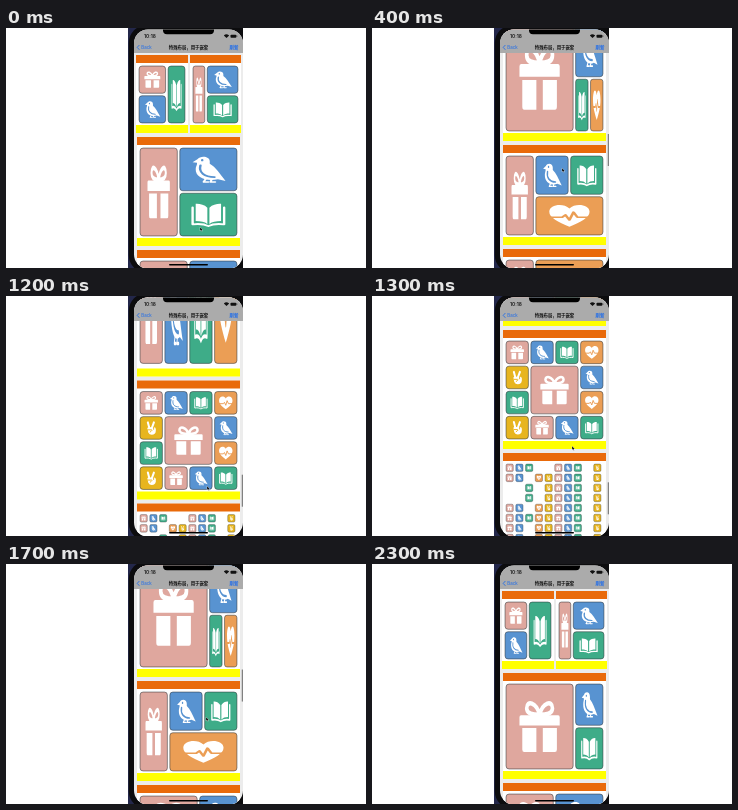
These frames come from a looping animation (360x240 px, 2400 ms). An HTML page with a canvas:

```html
<!DOCTYPE html>
<html lang="zh">
<head>
<meta charset="utf-8">
<style>
  html, body { margin: 0; width: 100%; height: 100%; overflow: hidden; background: #fff; }
  canvas { display: block; width: 360px; height: 240px; }
</style>
</head>
<body>
<canvas id="stage"></canvas>
<script>
const canvas = document.getElementById('stage');
const ctx = canvas.getContext('2d');
const dpr = window.devicePixelRatio || 1;
canvas.width = 360 * dpr;
canvas.height = 240 * dpr;

// Icons live in a 100 x 100 box: white fill, white line, and a line cut in the tile colour.
const icon = (color, fill, line, cut, lineWidth = 9) => ({
  color, lineWidth, fill: new Path2D(fill), line: new Path2D(line), cut: new Path2D(cut)
});
const icons = {
  g: icon('#dfa79e',
    'M4 28H96Q100 28 100 32V48H0V32Q0 28 4 28ZM7 53H42V100H12Q7 100 7 95ZM58 53H93V95Q93 100 88 100H58Z',
    'M50 27C42 2 18 -2 18 14C18 24 32 27 50 27C58 2 82 -2 82 14C82 24 68 27 50 27', ''),
  b: icon('#5893d1',
    'M4 22L18 10C26 -5 54 -3 54 18V28C72 42 82 64 100 95L78 88C44 98 12 82 13 48C13 38 18 32 17 24Z',
    'M42 88L36 99H50M60 88L56 99H70', 'M27 34C21 62 38 80 68 80M32 13V15', 6),
  k: icon('#3eac88',
    'M47 23C38 11 24 7 13 8V75C28 75 39 78 47 87ZM53 23C62 11 76 7 87 8V75C72 75 61 78 53 87Z',
    'M4 22V88C24 85 40 88 50 95C60 88 76 85 96 88V22', '', 7),
  h: icon('#eb9e55',
    'M50 98C22 76 0 58 0 32C0 2 34 -8 50 18C66 -8 100 2 100 32C100 58 78 76 50 98Z',
    '', 'M0 56H32L40 46L50 68L60 34L70 56H100', 7),
  p: icon('#e7b51f',
    'M22 52Q22 45 30 45H72Q84 46 84 58V72Q82 100 54 100Q36 100 28 84Z',
    'M36 50L25 9M55 50L70 9', 'M28 64H52Q62 66 50 74L42 80M68 46V60', 15)
};

function tile(key, x, y, w, h) {
  if (!icons[key]) return;
  const { color, fill, line, cut, lineWidth } = icons[key];
  const gap = 1.25;
  x += gap; y += gap; w -= 2 * gap; h -= 2 * gap;
  ctx.beginPath();
  ctx.roundRect(x, y, w, h, Math.min(3, w / 5));
  ctx.fillStyle = color;
  ctx.fill();
  ctx.strokeStyle = 'rgba(45,50,55,.75)';
  ctx.lineWidth = Math.min(.7, w * .06);
  ctx.stroke();
  ctx.save();
  ctx.translate(x + w * .2, y + h * .2);
  ctx.scale(w * .006, h * .006);
  ctx.lineJoin = ctx.lineCap = 'round';
  ctx.fillStyle = ctx.strokeStyle = '#fff';
  ctx.lineWidth = lineWidth;
  ctx.fill(fill);
  ctx.stroke(line);
  ctx.strokeStyle = color;
  ctx.lineWidth = 7;
  ctx.stroke(cut);
  ctx.restore();
}

// Layouts are nested functions that fill a rectangle.
const place = (node, ...box) => typeof node === 'string' ? tile(node, ...box) : node(...box);
const split = vertical => (weights, ...nodes) => (x, y, w, h) => {
  const total = weights.reduce((a, b) => a + b);
  let start = 0;
  nodes.forEach((node, i) => {
    const part = weights[i] / total;
    if (vertical) place(node, x, y + h * start, w, h * part);
    else place(node, x + w * start, y, w * part, h);
    start += part;
  });
};
const row = split(false), col = split(true);
const even = [1, 1], four = [1, 1, 1, 1];
const line = keys => row([...keys].map(() => 1), ...keys);

function rect(color, x, y, w, h) {
  ctx.fillStyle = color;
  ctx.fillRect(x, y, w, h);
}

function section(x, y, w, h, layout) {
  rect('#fff', x, y, w, h + 21);
  rect('#e96a0a', x, y, w, 8);
  rect('#ffff00', x, y + h + 13, w, 8);
  layout(x + 1.8, y + 9.8, w - 3.6, h + 2.4);
}

function sections(t) {
  const late = t >= 1700;
  const small = ['gb_hp', 'gb_hp', '__k_p', '__k_p', 'gb_hp', 'gbkhp', 'gb_hp', 'gb_hp', 'gb_hp', 'gbkhp'];
  if (t < 1500) small[0] = 'gbk__';
  return [
    [late ? 85 : 88, row(late ? [7, 3] : [2, 3], 'g', col(even, 'b', 'k'))],
    [104, col([2, 3], row(even, 'g', 'b'), 'k')],
    [100, col(even, 'g', row(even, 'b', 'k'))],
    [106, row([7, 3], 'g', col(even, 'b', row(even, 'k', 'h')))],
    [79, row([3, 7], 'g', col(even, row(even, 'b', 'k'), 'h'))],
    [70, late
      ? col(even, row([6, 4], 'g', 'b'), row([4, 6], 'k', 'h'))
      : row([3, 7], col(even, 'g', row(even, 'b', 'k')), 'h')],
    [100, row(even, col(even, row(even, 'g', 'b'), 'k'), 'h')],
    [100, col([97, 3], row(four, 'g', 'b', 'k', 'h'), '')],
    [98, col([1, 2, 1], line('gbkh'),
      row([1, 2, 1], col(even, 'p', 'k'), 'g', col(even, 'b', 'h')), line('pgbk'))],
    [98, row([98, 2], col(small.map(() => 1), ...small.map(keys => line(keys + 'gbk_p'))), '')]
  ];
}

function drawList(t, scroll) {
  let y = 27 - scroll;
  section(130, y, 52, 57, row(t >= 1700 ? even : [3, 2], col(even, 'g', 'b'), 'k'));
  section(184, y, 51, 57, row([3, 7], 'g', col(even, 'b', 'k')));
  y += 82;
  for (const [h, layout] of sections(t)) {
    if (y < 240 && y + h + 25 > 20) section(131, y, 103, h, layout);
    y += h + 25;
  }
}

function label(text, x, y, size, color, weight = 400, align = 'left') {
  ctx.font = `${weight} ${size}px Inter, "Noto Sans CJK SC", "Noto Sans CJK", sans-serif`;
  ctx.fillStyle = color;
  ctx.textAlign = align;
  ctx.fillText(text, x, y);
}

function drawBars() {
  const blue = '#1668ee';
  rect('#ababab', 127, 0, 110, 25);
  label('10:18', 138, 10, 4.8, '#111', 600);
  ctx.beginPath();
  ctx.moveTo(220.5, 10);
  ctx.arc(220.5, 10, 3.6, -Math.PI * .77, -Math.PI * .23);
  ctx.fill();
  ctx.beginPath();
  ctx.roundRect(224.5, 6.7, 5.8, 3, .8);
  ctx.fill();
  rect('#111', 230.7, 7.5, .5, 1.4);
  ctx.strokeStyle = blue;
  ctx.lineWidth = .8;
  ctx.stroke(new Path2D('M133.4 17L131.2 19.4L133.4 21.8'));
  label('Back', 135.3, 21, 4.4, blue);
  label('特殊布局，用于嵌套', 182.5, 21.2, 4.4, '#111', 700, 'center');
  label('刷新', 223.5, 21.2, 4.4, blue, 600);
  ctx.fillStyle = '#000';
  ctx.beginPath();
  ctx.roundRect(157, -6, 51, 12.2, 4);
  ctx.fill();
  ctx.beginPath();
  ctx.roundRect(163, 236, 39, 1.6, .8);
  ctx.fill();
}

function drawPointer(x, y) {
  ctx.save();
  ctx.translate(x, y);
  ctx.fillStyle = '#000';
  ctx.strokeStyle = '#fff';
  ctx.lineWidth = .3;
  const arrow = new Path2D('M0 0V4L1 3.1L1.7 4.6L2.3 4.3L1.7 2.9H2.9Z');
  ctx.fill(arrow);
  ctx.stroke(arrow);
  ctx.restore();
}

// [time, scroll offset, pointer x, pointer y]; each pose is held until the next.
const poses = [
  [0, 0, 194, 199], [100, 60, 190, 194], [200, 134, 183, 184], [300, 300, 186, 160],
  [400, 490, 190, 140], [700, 688.5, 199, 185], [1200, 971.5, 201, 190], [1300, 1022, 200, 150],
  [1400, 1050, 198, 105], [1500, 1059.5, 195, 75], [1600, 780, 198, 120], [1700, 487, 200, 153],
  [2100, 250, 203, 180], [2200, 80], [2300, 0]
];

function draw() {
  const t = performance.now() % 2400;
  const [, scroll, px, py] = poses.findLast(pose => pose[0] <= t);
  ctx.setTransform(dpr, 0, 0, dpr, 0, 0);
  rect('#fff', 0, 0, 360, 240);
  rect('#23274a', 122, 0, 115, 240);
  ctx.fillStyle = '#0c0c0e';
  ctx.beginPath();
  ctx.roundRect(122.8, -3, 114.2, 248, [18, 0, 0, 18]);
  ctx.fill();
  ctx.save();
  ctx.beginPath();
  ctx.roundRect(128, 1.5, 109, 239, 14);
  ctx.clip();
  rect('#ececec', 127, 0, 110, 240);
  drawList(t, scroll);
  if (scroll) rect('#666', 235.8, 32 + scroll * .151, 1, 32);
  drawBars();
  if (px) drawPointer(px, py);
  ctx.restore();
  requestAnimationFrame(draw);
}
draw();
</script>
</body>
</html>
```
